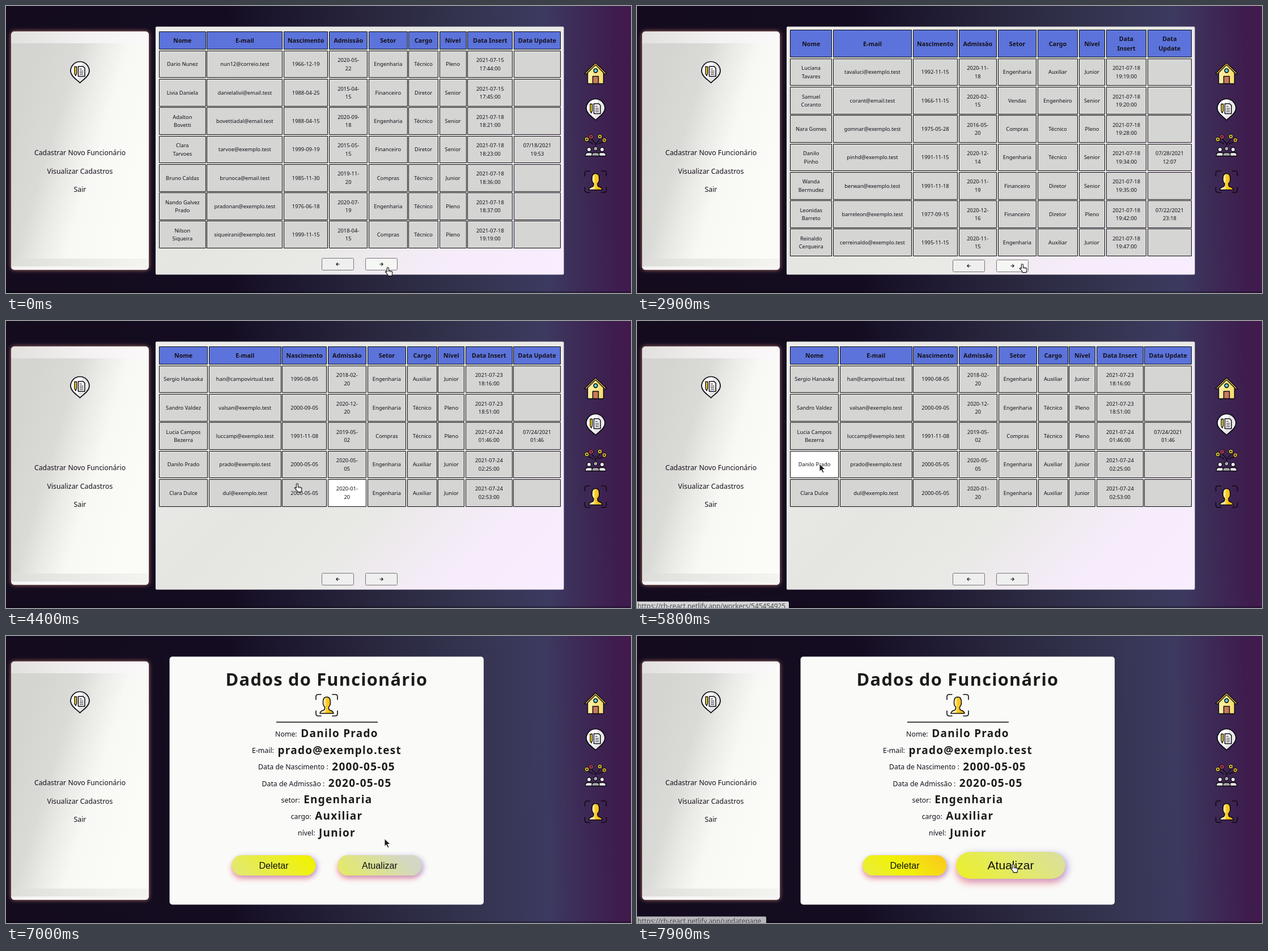
Write an HTML page with a canvas that moves like this. It is 1103 px wide and 508 px high and loops after 8 s.

```html
<!DOCTYPE html>
<html lang="pt-BR">
<head>
<meta charset="utf-8">
<title>Funcionários</title>
<style>
html, body { margin: 0; width: 100%; height: 100%; overflow: hidden; background: #140b1e; }
canvas { display: block; }
</style>
</head>
<body>
<canvas id="stage" width="1103" height="508"></canvas>
<script>
const W = 1103, H = 508, LOOP = 8000, STEP = 100;
const ctx = document.getElementById('stage').getContext('2d');
const SANS = '"Noto Sans", "Open Sans", sans-serif';
const INK = '#17101a', LINE = '#0d0a12';

const HEADS = ['Nome', 'E-mail', 'Nascimento', 'Admissão', 'Setor', 'Cargo', 'Nível', 'Data Insert', 'Data Update'];

// "|" breaks a line; the insert column is stored as day and time
const PAGES = [
  {
    edges: [270, 354.3, 490, 570, 640, 710.3, 764.6, 814.3, 896, 980.6],
    top: 45, head: 32, buttons: 446,
    rows: `Dario Nunez;nun12@correio.test;1966-12-19;2020-05-22;Engenharia;Técnico;Pleno;15 17:44;
Livia Daniela;danielalivi@email.test;1988-04-25;2015-04-15;Financeiro;Diretor;Senior;15 17:45;
Adalton|Bovetti;bovettiadal@email.test;1988-04-15;2020-09-18;Engenharia;Técnico;Senior;18 18:21;
Clara|Tarvoes;tarvoe@exemplo.test;1999-09-19;2015-05-15;Financeiro;Diretor;Senior;18 18:23;07/18/2021|19:53
Bruno Caldas;brunoca@email.test;1985-11-30;2019-11-20;Compras;Técnico;Junior;18 18:36;
Nando Galvez|Prado;pradonan@exemplo.test;1976-06-18;2020-07-19;Engenharia;Técnico;Pleno;18 18:37;
Nilson|Siqueira;siqueirani@exemplo.test;1999-11-15;2018-04-15;Compras;Técnico;Pleno;18 19:19;`
  },
  {
    edges: [270, 346, 486.5, 567.6, 636.5, 707, 779.5, 828, 900.8, 980.6],
    top: 42, head: 49, buttons: 449, wrapHeads: true,
    rows: `Luciana|Tavares;tavaluci@exemplo.test;1992-11-15;2020-11-18;Engenharia;Auxiliar;Junior;18 19:19;
Samuel|Coranto;corant@email.test;1966-11-15;2020-02-15;Vendas;Engenheiro;Senior;18 19:20;
Nara Gomes;gomnar@exemplo.test;1975-05-28;2016-05-20;Compras;Técnico;Pleno;18 19:28;
Danilo|Pinho;pinhd@exemplo.test;1991-11-15;2020-12-14;Engenharia;Técnico;Senior;18 19:34;07/28/2021|12:07
Wanda|Bermudez;berwan@exemplo.test;1991-11-18;2020-11-19;Financeiro;Diretor;Senior;18 19:35;
Leonidas|Barreto;barreleon@exemplo.test;1977-09-15;2020-12-16;Financeiro;Diretor;Pleno;18 19:42;07/22/2021|23:18
Reinaldo|Cerqueira;cerreinaldo@exemplo.test;1995-11-15;2020-11-15;Engenharia;Auxiliar;Junior;18 19:47;`
  },
  {
    edges: [270, 357.7, 487.3, 567.8, 637.5, 708, 762.4, 811, 895.3, 980.6],
    top: 45, head: 32, buttons: 446,
    rows: `Sergio Hanaoka;han@campovirtual.test;1990-08-05;2018-02-20;Engenharia;Auxiliar;Junior;23 18:16;
Sandro Valdez;valsan@exemplo.test;2000-09-05;2020-12-20;Engenharia;Técnico;Pleno;23 18:51;
Lucia Campos|Bezerra;luccamp@exemplo.test;1991-11-08;2019-05-02;Compras;Técnico;Pleno;24 01:46;07/24/2021|01:46
Danilo Prado;prado@exemplo.test;2000-05-05;2020-05-05;Engenharia;Auxiliar;Junior;24 02:25;
Clara Dulce;dul@exemplo.test;2000-05-05;2020-01-20;Engenharia;Auxiliar;Junior;24 02:53;`
  }
];
for (const page of PAGES) {
  page.rows = page.rows.split('\n').map(line => {
    const cells = line.split(';');
    cells[3] = cells[3].slice(0, 8) + '|' + cells[3].slice(8);
    cells[7] = '2021-07-' + cells[7].replace(' ', '|') + ':00';
    return cells;
  });
}

const DETAILS = [
  ['Nome:', 'Danilo Prado'], ['E-mail:', 'prado@exemplo.test'],
  ['Data de Nascimento :', '2000-05-05'], ['Data de Admissão :', '2020-05-05'],
  ['setor:', 'Engenharia'], ['cargo:', 'Auxiliar'], ['nível:', 'Junior']
];

// pointer keys: time, x, y, h(and) or a(rrow); "jump" keys hold the previous place until their time
const POINTER = [
  [0, 674, 463, 'h'], [900, 675, 467, 'h', 'jump'], [1200, 726, 489, 'a'], [1700, 664, 458, 'h'],
  [1900, 664, 458, 'h'], [2200, 728, 488, 'a'], [2900, 680, 457, 'h', 'jump'], [3800, 680, 457, 'h'],
  [3900, 688, 430, 'a'], [4100, 707, 359, 'a'], [4400, 514, 288, 'h', 'jump'], [4600, 440, 290, 'h'],
  [4800, 345, 290, 'h', 'jump'], [4900, 325, 258, 'h'], [5000, 325, 258, 'h'], [5300, 322, 253, 'h'],
  [5800, 322, 253, 'a', 'jump'], [6600, 668, 359, 'a'], [7500, 668, 359, 'a'], [7700, 666, 392, 'h'],
  [7900, 664, 404, 'h']
];

// highlighted cell: time, column, row
const HOVER = [[4400, 3, 4], [4500, 2, 4], [4600, 1, 4], [4800, 0, 4], [4900, 0, 3]];

const clamp = v => Math.max(0, Math.min(1, v));
const lastKey = (keys, t) => keys.filter(k => k[0] <= t).pop();

function pointerAt(t) {
  const a = lastKey(POINTER, t), b = POINTER[POINTER.indexOf(a) + 1];
  if (!b || b[4]) return { x: a[1], y: a[2], kind: a[3] };
  const k = (t - a[0]) / (b[0] - a[0]), e = k * k * (3 - 2 * k);
  return { x: a[1] + (b[1] - a[1]) * e, y: a[2] + (b[2] - a[2]) * e, kind: k > .4 ? b[3] : a[3] };
}

function ramp(x0, y0, x1, y1, stops) {
  const g = ctx.createLinearGradient(x0, y0, x1, y1);
  stops.forEach(([p, color]) => g.addColorStop(p, color));
  return g;
}

function box(x, y, w, h, r, fill, stroke) {
  ctx.beginPath();
  ctx.roundRect(x, y, w, h, r);
  ctx.fillStyle = fill;
  ctx.fill();
  if (stroke) {
    ctx.strokeStyle = stroke;
    ctx.lineWidth = 1;
    ctx.stroke();
  }
}

function label(str, x, y, font, { align = 'center', color = INK, gap = 0 } = {}) {
  ctx.font = font;
  ctx.letterSpacing = gap + 'px';
  ctx.textAlign = align;
  ctx.fillStyle = color;
  ctx.fillText(str, x, y);
  ctx.letterSpacing = '0px';
}

function shape(d, fill, stroke, width = 1.6) {
  const p = new Path2D(d);
  if (fill) { ctx.fillStyle = fill; ctx.fill(p); }
  if (stroke) { ctx.strokeStyle = stroke; ctx.lineWidth = width; ctx.stroke(p); }
}

const disc = (x, y, r) => `M${x - r} ${y}a${r} ${r} 0 1 0 ${2 * r} 0a${r} ${r} 0 1 0 ${-2 * r} 0Z`;

function at(x, y, draw, scale = 1) {
  ctx.save();
  ctx.translate(x, y);
  ctx.scale(scale, scale);
  ctx.lineJoin = ctx.lineCap = 'round';
  draw();
  ctx.restore();
}

function pinIcon() {
  shape('M0 19.5C-5 14-16.5 8-16.5-1.5A16.5 16.5 0 0 1 16.5-1.5C16.5 8 5 14 0 19.5Z',
    ramp(-14, 0, 14, 6, [[0, '#ffffff'], [.5, '#f6f6f6'], [.52, '#e4e4e6'], [1, '#eaeaec']]), LINE, 1.7);
  shape('M-9.5-9h3.6v12l-1.8 4l-1.8-4Z', '#f5d51e', LINE, 1.3);
  shape('M-3-9.5h8.5l3 3v14.5h-11.5Z', '#fafafa', LINE, 1.5);
  shape('M0-5h3M0-1.5h5.5M0 1.5h5.5M0 4.5h5.5', null, LINE, 1.1);
}

function houseIcon() {
  shape('M-14 17.5V-2L0-16L14-2V17.5Z', ramp(-14, 0, 14, 0, [[0, '#fdf0a6'], [.5, '#fbe88c'], [1, '#f5d96a']]), LINE, 1.5);
  shape('M-18-.5L0-18L18-.5', null, LINE, 3.4);
  shape('M-17-1L0-17.5L17-1', null, '#f0c63e', 1.2);
  shape('M-5 17.5V4.5h10v13Z', '#c77a5c', LINE, 1.5);
  shape(disc(0, -5.5, 3.4), '#62d3df', LINE, 1.5);
}

function peopleIcon() {
  shape('M-8-13C-6-6 0-8 0 0M8-13C7-6 1-6 0 0M-14-9C-12-3-6-6-5-2M15-8C12-2 6-6 5-2', null, LINE, 1.4);
  [[-15.5, -10.5, '#eedc32'], [-8, -15, '#d8475a'], [7.5, -15.5, '#eedc32'], [15.5, -9, '#f2c22e']].forEach(([x, y, color]) => {
    shape(disc(x, y, 3.8), color, LINE, 1.1);
    shape(`M${x - 1.2} ${y - 1.2}l2.4 2.4m0-2.4l-2.4 2.4`, null, LINE, 1.1);
  });
  [[-11.5, 7.5, '#ececec'], [11.5, 7.5, '#ececec'], [0, 6, '#a7a7aa']].forEach(([x, y, color]) => {
    shape(`M${x - 6.5} 19v-1.5q0-4.5 4.5-4.5h4q4.5 0 4.5 4.5v1.5Z`, color, LINE, 1.3);
    shape(disc(x, y, 3.6), color, LINE, 1.3);
  });
}

function bustIcon() {
  shape('M-19-10v-5q0-4 4-4h5M10-19h5q4 0 4 4v5M19 10v5q0 4-4 4h-5M-10 19h-5q-4 0-4-4v-5', null, LINE, 1.6);
  shape('M-12 14.5q1-4.5 6-5.5q2.5-1 2.5-4v-2q-3-2.5-3-7.5q-.5-10 6.5-10q7 0 6.5 10q0 5-3 7.5v2q0 3 2.5 4q5 1 6 5.5Z',
    ramp(-8, 0, 8, 0, [[0, '#fdf3c4'], [.36, '#fce48a'], [.42, '#fccf2c'], [1, '#f7b912']]), LINE, 1.5);
}

function pointer({ x, y, kind }) {
  at(x, y, () => {
    if (kind === 'a') {
      shape('M0 0v13.5l3.2-3l2.4 5.4l2.4-1l-2.4-5.3h4.4Z', '#1c1c1c', '#ffffff', 1);
    } else {
      shape('M-1.6 1.2q0-1.4 1.5-1.4q1.5 0 1.5 1.4v4.3q4.6.4 6.1 1.6q.7.7.5 2.4l-.9 3.3v1.8h-7v-1.8l-4.3-4.6q-.8-1.4.6-1.7q.8 0 2 1.3Z',
        '#ffffff', '#111111', 1.1);
      shape('M1.5 5.5v2M3.8 6.2v1.6M5.9 6.6v1.6', null, '#111111', .8);
    }
  });
}

function backdrop() {
  ctx.fillStyle = ramp(0, 20, W, 0, [
    [0, '#140b1e'], [.35, '#140c20'], [.4, '#19132a'], [.6, '#2a2840'], [.74, '#34344f'],
    [.86, '#3c3a60'], [.91, '#3d2c57'], [.97, '#3e1d4e'], [1, '#421a4c']]);
  ctx.fillRect(0, 0, W, H);
  ctx.fillStyle = 'rgba(0,0,0,.3)';
  ctx.fillRect(0, 505, W, 3);
}

function sidebar() {
  ctx.save();
  ctx.shadowColor = 'rgba(255,170,140,.7)';
  ctx.shadowBlur = 7;
  box(9, 45, 243, 422, 6, '#eee');
  ctx.restore();
  box(9, 45, 243, 422, 6, ramp(9, 45, 252, 130, [[0, '#e1e0de'], [.5, '#f3f1f1'], [.9, '#fbf9fa'], [1, '#f5f5f3']]));
  ctx.fillStyle = ramp(9, 220, 240, 290, [[0, '#d4d4d1'], [.3, '#dadad7'], [.45, '#e9e9e6'], [.65, '#f8f8f5'], [1, '#fbfbf8']]);
  ctx.fillRect(9, 66, 243, 381);
  ctx.fillStyle = ramp(9, 447, 252, 447, [[0, '#dcdcd9'], [.4, '#e8e8e5'], [1, '#f4f4f1']]);
  ctx.fillRect(9, 447, 243, 14);
  at(130.5, 116.5, pinIcon);
  ['Cadastrar Novo Funcionário', 'Visualizar Cadastros', 'Sair'].forEach((item, i) =>
    label(item, 130.5, 264 + i * 32.6, '12.3px ' + SANS));
}

function navIcons() {
  at(1040.5, 120, houseIcon);
  at(1040.5, 182.5, pinIcon);
  at(1040.5, 246.5, peopleIcon);
  at(1040.5, 311, bustIcon);
}

function cell(x, y, x2, y2, fill, lines, font, pitch, drop) {
  const l = Math.round(x) + .5, t = Math.round(y) + .5;
  box(l, t, Math.round(x2) - .5 - l, Math.round(y2) - .5 - t, 0, fill, '#0a0a0a');
  lines.forEach((s, i) =>
    label(s, (x + x2) / 2, (y + y2) / 2 + drop + (i - (lines.length - 1) / 2) * pitch, font));
}

function pageButton(x, y, arrow, fill) {
  box(x + .5, y + .5, 56, 21, 2, fill, '#767676');
  at(x + 28.5, y + 11, () => shape(`M-2.7 0h5.4M${arrow * 2.7} 0l${-arrow * 2.4}-2.4m${arrow * 2.4} 2.4l${-arrow * 2.4} 2.4`, null, '#111', 1.1));
}

function table(t, mouse) {
  const page = PAGES[t < 100 ? 0 : t < 3200 ? 1 : 2];
  const hot = lastKey(HOVER, t);
  box(264, 36.5, 720.5, 439, 2, ramp(335, -33, 913, 545, [[0, '#ededeb'], [.4, '#e5e5e2'], [.6, '#e9e9e6'], [.8, '#f6ecfa'], [1, '#f9edff']]));
  for (let c = 0; c < 9; c++) {
    const x = page.edges[c], x2 = page.edges[c + 1] - 1.6;
    const head = page.wrapHeads ? HEADS[c].split(' ') : [HEADS[c]];
    cell(x, page.top, x2, page.top + page.head, '#5b73da', head, 'bold 10.7px ' + SANS, 17, 4);
    page.rows.forEach((row, r) => {
      const y = page.top + page.head + 1.7 + r * 50.3;
      const lit = hot && hot[1] === c && hot[2] === r;
      cell(x, y, x2, y + 48.7, lit ? '#ffffff' : '#d5d5d3', row[c].split('|'), '9.35px ' + SANS, 14.4, 3.4);
    });
  }
  const by = page.buttons;
  const over = mouse.x > 634 && mouse.x < 691 && mouse.y > by && mouse.y < by + 22;
  const pressed = t < 100 || (t >= 2900 && t < 3200);
  pageButton(557, by, -1, '#efefef');
  pageButton(634, by, 1, pressed ? '#f6f6f5' : over ? '#e5e5e5' : '#efefef');
}

// sheen: palette position at the left edge; slope: palette change across the width
function pill(cx, name, sheen, slope, scale) {
  const w = 148, h = 36;
  at(cx, 406, () => {
    [['rgba(245,90,90,.5)', -1, 6], ['rgba(120,110,230,.45)', 4, 2]].forEach(([color, dx, dy]) => {
      ctx.save();
      ctx.shadowColor = color;
      ctx.shadowBlur = 10 * scale;
      ctx.shadowOffsetX = dx * scale;
      ctx.shadowOffsetY = dy * scale;
      box(-w / 2, -h / 2, w, h, 18, '#e3ea68');
      ctx.restore();
    });
    const m = slope / w, x0 = -w / 2 - sheen / m, d = 1.5 / m;
    box(-w / 2, -h / 2, w, h, 18, ramp(x0, 0, x0 + d, -d,
      [[0, '#d3d7c4'], [1 / 3, '#e3ea68'], [2 / 3, '#f0f208'], [1, '#ffba25']]));
    label(name, 0, 5.5, '16.2px "Liberation Sans", Arial, sans-serif', { color: '#111' });
  }, scale);
}

function details(t) {
  box(288.6, 36.5, 554.4, 439, 5, '#fafaf8');
  label('Dados do Funcionário', 566, 88, 'bold 30.8px ' + SANS, { gap: 1.2, color: '#1b1b1b' });
  at(566, 122.5, bustIcon);
  ctx.fillStyle = '#111';
  ctx.fillRect(477, 151.7, 179, 1.6);
  const small = '12.3px ' + SANS, big = 'bold 19px ' + SANS;
  DETAILS.forEach(([name, value], i) => {
    const y = 178.5 + i * 29.2;
    ctx.font = small;
    const a = ctx.measureText(name).width + 6.5;
    ctx.font = big;
    ctx.letterSpacing = '1.25px';
    const b = ctx.measureText(value).width;
    const x = 566 - (a + b) / 2;
    label(name, x, y - .5, small, { align: 'left' });
    label(value, x + a, y + .8, big, { align: 'left', gap: 1.25, color: '#1b1b1b' });
  });
  const sheen = .95 + .6 * (t - 7000) / 900;
  pill(472.5, 'Deletar', sheen, 1.1, 1);
  pill(659.5, 'Atualizar', sheen, -1.05, 1 + .3 * clamp((t - 7600) / 300));
}

function statusBar(path, width, fill) {
  box(-4, 496.5, width + 4, 16, 2, fill);
  label('https://rh-react.netlify.app/' + path, 1, 509, '11.85px ' + SANS, { align: 'left', color: '#4a4a50' });
}

function draw(t) {
  const mouse = pointerAt(t);
  backdrop();
  sidebar();
  navIcons();
  if (t < 5900) table(t, mouse); else details(t);
  if (t >= 5100 && t < 5900) statusBar('workers/545454925', 268, '#d6d6d8');
  if (t >= 7800) statusBar('updatepage', 228, '#b8b8bb');
  pointer(mouse);
}

const start = performance.now();
function tick() {
  const t = (performance.now() - start) % LOOP;
  draw(Math.floor(t / STEP) * STEP);
  requestAnimationFrame(tick);
}
tick();
</script>
</body>
</html>
```
